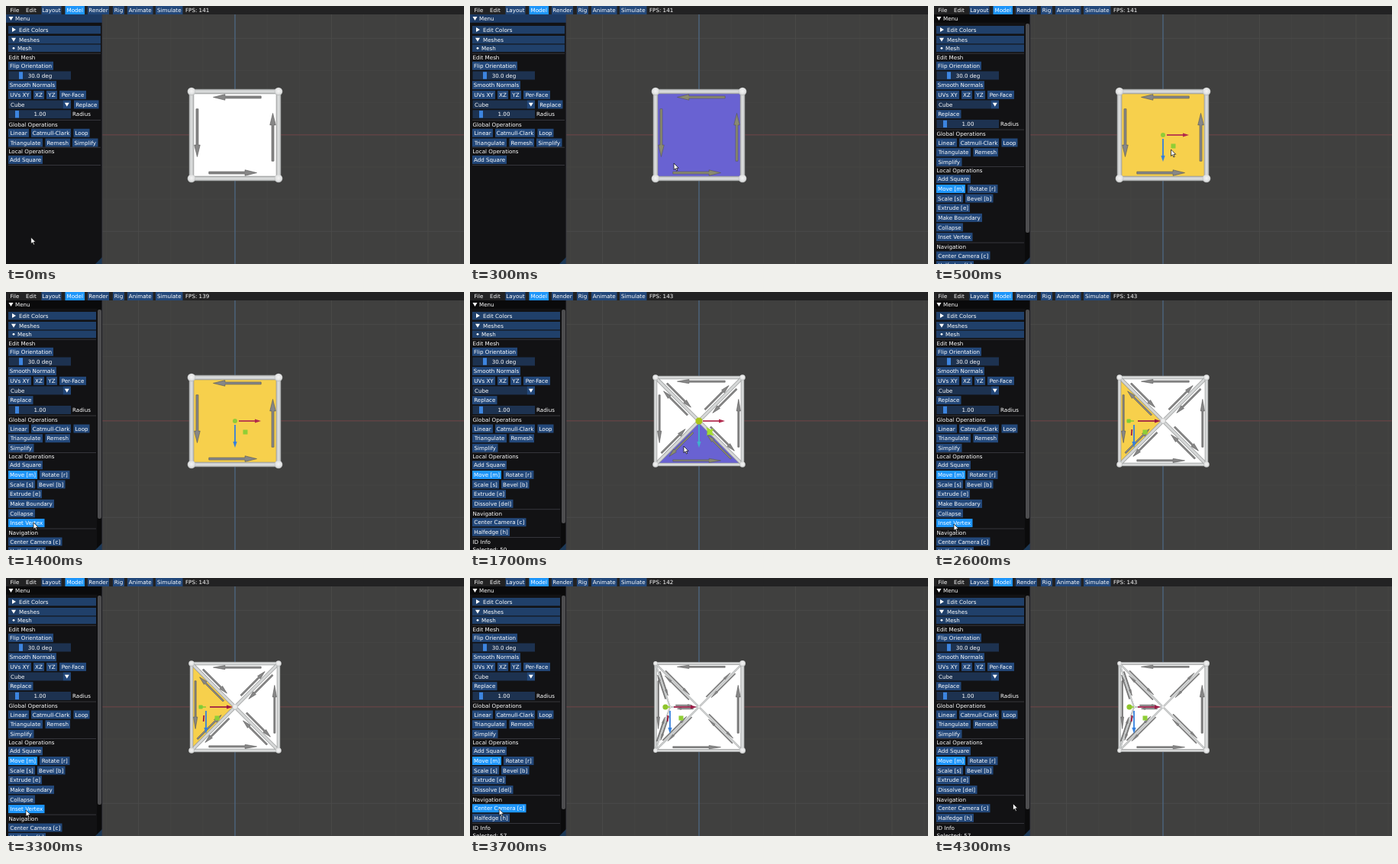
These frames come from a looping animation (600 px wide and 338 px high, 4400 ms). An HTML page:

```html
<!DOCTYPE html>
<html lang="en">
<head>
<meta charset="utf-8">
<title>Mesh editor</title>
<style>
html, body { margin: 0; width: 100%; height: 100%; overflow: hidden; background: #40403f; }
svg { display: block; width: 600px; height: 338px; }
text { font: 7.15px "DejaVu Sans", sans-serif; fill: #fff; white-space: pre; }
</style>
</head>
<body>
<svg id="stage" viewBox="0 0 600 338">
  <defs>
    <radialGradient id="ball" cx=".5" cy=".45" r=".55">
      <stop offset="0" stop-color="#f4f4f4"/>
      <stop offset=".65" stop-color="#e2e3e3"/>
      <stop offset="1" stop-color="#b4b6b6"/>
    </radialGradient>
  </defs>
  <g id="back"></g>
  <g id="mesh"></g>
  <g id="ui"></g>
  <path id="cursor" d="M0 0V8.6L2 6.8L3.4 10L4.8 9.4L3.4 6.3H6.2Z" fill="#fff" stroke="#000" stroke-width=".7"/>
</svg>
<script>
const $ = id => document.getElementById(id);
const LOOP = 4400, STEP = 100;
const BLUE = '#23487a', LIT = '#1e96fa', HEAD = '#20406a';
const YELLOW = '#f7d04c', VIOLET = '#6962d2';

const rect = (x, y, w, h, fill, more = '') =>
  `<rect x="${x}" y="${y}" width="${w}" height="${h}" fill="${fill}" ${more}/>`;
const line = (a, b, color, w, more = '') =>
  `<line x1="${a[0]}" y1="${a[1]}" x2="${b[0]}" y2="${b[1]}" stroke="${color}" stroke-width="${w}" ${more}/>`;
const poly = (pts, fill, more = '') => `<polygon points="${pts.join(' ')}" fill="${fill}" ${more}/>`;
const disc = (p, r, fill) => `<circle cx="${p[0]}" cy="${p[1]}" r="${r}" fill="${fill}"/>`;
const label = (s, x, y, anchor = 'start') =>
  `<text x="${x}" y="${y + 2.6}" text-anchor="${anchor}">${s}</text>`;

// ---- viewport grid
function grid() {
  let s = rect(0, 0, 600, 338, '#40403f');
  for (let i = -4; i <= 7; i++) {
    const x = 300 + i * 42.15;
    s += line([x, 11], [x, 338], i % 3 ? '#444443' : '#4a4a49', 1);
  }
  for (let i = -3; i <= 4; i++) {
    const y = 168.8 + i * 42.15;
    s += line([126, y], [600, y], i % 3 ? '#444443' : '#4a4a49', 1);
  }
  return s + line([126, 168.8], [600, 168.8], '#6b4044', 1) + line([300, 11], [300, 338], '#4f6f92', 1);
}

// ---- mesh
const V = [[243, 112], [357, 112], [357, 226], [243, 226], [300, 169], [262, 169]];
const FAN = [[1, 0, 4], [3, 2, 4], [2, 1, 4]];
const SHAPES = [
  { faces: [[1, 0, 3, 2]], radii: [5.3, 5.3, 5.3, 5.3], width: () => 6.5 },
  { faces: [...FAN, [0, 3, 4]], radii: [3.8, 3.8, 3.8, 3.8, 3.8], width: () => 4.5 },
  {
    faces: [...FAN, [0, 3, 5], [3, 4, 5], [4, 0, 5]],
    radii: [2.9, 4, 4, 2.9, 2, 1.5],
    width: (a, b) => Math.max(a, b) === 5 ? 1.9 : Math.max(a, b) === 4 ? 2.3 :
      a + b === 3 && a * b ? 5 : a + b === 3 ? 3.2 : 3.8
  }
];

// true when p lies inside the loop of points
function inside(p, pts) {
  return pts.every((a, i) => {
    const b = pts[(i + 1) % pts.length];
    return (b[1] - a[1]) * (p[0] - a[0]) - (b[0] - a[0]) * (p[1] - a[1]) >= 0;
  });
}

function bar(a, b, w) {
  return line(a, b, '#8c8e8e', w) + line(a, b, '#c6c8c8', w * .8) + line(a, b, '#d8dada', w * .4);
}

// arrow running beside one side of a face
function halfEdge(a, b, w, fill) {
  const dx = b[0] - a[0], dy = b[1] - a[1], len = Math.hypot(dx, dy);
  const ux = dx / len, uy = dy / len;
  const at = (t, off) => [a[0] + ux * t + uy * off, a[1] + uy * t - ux * off].map(v => +v.toFixed(2));
  const off = w * 1.15, s = Math.max(.55, w * .23), h = Math.max(1.2, w * .58);
  const tail = len * .2, tip = len * .75, neck = tip - len * .135;
  return poly([at(tail, off - s), at(neck, off - s), at(neck, off - h), at(tip, off),
    at(neck, off + h), at(neck, off + s), at(tail, off + s)], fill, 'stroke="#555" stroke-width=".6"');
}

function axis(o, dir, from, to, color, w) {
  const p = (t, n) => [o[0] + dir[0] * t + dir[1] * n, o[1] + dir[1] * t + dir[0] * n];
  return line(p(from, 0), p(to - 8, 0), color, w) + poly([p(to - 8, 2.6), p(to, 0), p(to - 8, -2.6)], color);
}

function gizmo(st) {
  const side = st >= 3, o = side ? V[5] : V[4];
  let s = axis(o, [1, 0], 5, side ? 35 : 34, side ? '#9c1844' : '#b22a4c', 1.7);
  s += axis(o, [0, 1], 5, 35, st === 2 ? '#3fb2cc' : '#3580dd', 1.8);
  s += rect(o[0] + (side ? 11.5 : 10.5), o[1] + 11.5, 6, 6, '#8fce36');
  if (st === 2) {
    s += poly([[309, 177], [315, 180], [319, 179], [317, 184], [320, 188], [313, 187], [310, 188], [312, 183]], '#a4dc30');
    return s + disc(o, 4.6, '#a9c41c');
  }
  if (!side) return s + disc(o, 3, '#90cc38');
  s += line([259.3, 180], [258.7, 188], '#a01840', 1.7);
  s += line([257, 169], [262, 169], '#8fce36', 1.6);
  return s + (st === 4 ? disc([256, 169], 3.6, '#8fc42c') : rect(252.5, 166.4, 5.2, 5.2, '#7fcc38', 'rx="1"'));
}

function mesh(st, mouse) {
  const shape = SHAPES[st < 2 ? 0 : st < 4 ? 1 : 2];
  let fills = '', bars = '', arrows = '';
  const done = {};
  shape.faces.forEach((f, i) => {
    const pts = f.map(k => V[k]);
    const picked = st === 1 || (st === 3 && i === 3);
    const over = !picked && mouse[0] > 126 && inside(mouse, pts);
    fills += poly(pts, picked ? YELLOW : over ? VIOLET : '#fff');
    f.forEach((a, j) => {
      const b = f[(j + 1) % f.length], w = shape.width(a, b);
      const key = Math.min(a, b) * 9 + Math.max(a, b);
      if (!done[key]) bars += bar(V[a], V[b], w);
      done[key] = true;
      arrows += halfEdge(V[a], V[b], w, over ? '#8a8a70' : '#878787');
    });
  });
  const balls = shape.radii.map((r, k) => disc(V[k], r, 'url(#ball)')).join('');
  return fills + bars + arrows + balls + (st ? gizmo(st) : '');
}

// ---- side panel
function panel(st, mouse) {
  const wide = st === 0, right = wide ? 124 : 118;
  const button = (s, x, w, y, on) => {
    const hot = on || (mouse[0] > x && mouse[0] < x + w && Math.abs(mouse[1] - y) < 5.6);
    return rect(x, y - 5.5, w, 11, hot ? LIT : BLUE) + label(s, x + w / 2, y, 'middle');
  };
  const tri = (x, y, down) => poly(down ? [[x - 3, y - 2.2], [x + 3, y - 2.2], [x, y + 2.8]]
    : [[x - 2, y - 3], [x - 2, y + 3], [x + 3, y]], '#fff');
  const header = (s, y, down) => rect(3, y - 5, right - 3, 10.4, HEAD) + tri(10, y, down) + label(s, 17, y);
  const slider = (s, y, grab) => rect(3.5, y - 5.5, 81.5, 11, '#1d3250') +
    rect(grab, y - 4.7, 5, 9.4, '#3d85e0') + label(s, 44.5, y, 'middle');
  const rule = y => rect(3, y, right - 3, .7, '#45454c');

  let s = rect(0, 11, 126, 327, '#121214') + rect(0, 11, 126, 10.8, wide ? '#1d3a63' : '#0a0a0b');
  s += tri(6.5, 16.3, true) + label('Menu', 12, 16.3);
  s += header('Edit Colors', 31, false) + header('Meshes', 44, true);
  s += rect(3, 50.5, right - 3, 9.6, HEAD) + disc([10, 55.3], 1.4, '#fff') + label('Mesh', 15, 55.3);
  s += rule(61.8) + label('Edit Mesh', 3.5, 67);
  s += button('Flip Orientation', 3, 59, 78.3) + slider('30.0 deg', 91, 17);
  s += button('Smooth Normals', 3, 63, 103.7);
  s += button('UVs XY', 3, 30, 116.4) + button('XZ', 36, 14, 116.4) + button('YZ', 53, 14, 116.4) +
    button('Per-Face', 70, 35, 116.4);
  s += rect(3.5, 123.5, 71, 11, '#1d3250') + rect(74.5, 123.5, 10.5, 11, BLUE) + tri(79.8, 129, true) + label('Cube', 6, 129);
  s += wide ? button('Replace', 89, 32.5, 129) : button('Replace', 3, 32.5, 141.7);

  const d = wide ? 0 : 12.7;
  s += slider('1.00', 141.8 + d, 12) + label('Radius', 87, 141.8 + d);
  s += rule(149 + d) + label('Global Operations', 3.5, 155 + d);
  s += button('Linear', 3, 27, 166.3 + d) + button('Catmull-Clark', 33, 52, 166.3 + d) + button('Loop', 88.5, 21, 166.3 + d);
  s += button('Triangulate', 3, 45, 179 + d) + button('Remesh', 51.5, 32.5, 179 + d);
  s += wide ? button('Simplify', 87, 33.5, 179) : button('Simplify', 3, 33.5, 204.3);
  const k = wide ? 0 : 25.3;
  s += rule(184.8 + k) + label('Local Operations', 3.5, 190.2 + k) + button('Add Square', 3, 45, 201.4 + k);

  if (wide) {
    s += rule(208);
  } else {
    s += button('Move [m]', 3, 38, 239.5, true) + button('Rotate [r]', 44, 39.5, 239.5);
    s += button('Scale [s]', 3, 35, 252) + button('Bevel [b]', 41, 36.5, 252) + button('Extrude [e]', 3, 44, 264.7);
    const vertex = st === 2 || st === 4, n = vertex ? 0 : 25.3;
    if (vertex) {
      s += button('Dissolve [del]', 3, 53.5, 277.4);
    } else {
      s += button('Make Boundary', 3, 60, 277.4) + button('Collapse', 3, 35, 290) + button('Inset Vertex', 3, 47.5, 302.6);
    }
    s += rule(284.4 + n) + label('Navigation', 3.5, 290.4 + n);
    s += button('Center Camera [c]', 3, 70.5, 301.7 + n) + button('Halfedge [h]', 3, 49, 314.3 + n);
    if (vertex) s += rule(321.3) + label('ID Info', 3.5, 327.5) + label('Selected: ' + (st === 2 ? 50 : 57), 3.5, 337.6);
    s += rect(119, 22, 7, 316, '#0b0b0c') + rect(120, 23, 5, vertex ? 280 : 274, '#4d4d4f', 'rx="2"');
  }
  s += poly([[126, 329], [126, 338], [117, 338]], '#1b3857');
  return s + rect(125.6, 11, .7, 327, '#3a3a42');
}

function menuBar(fps) {
  const tabs = [['Layout', 46.5, 26], ['Model', 77.5, 25.5], ['Render', 107, 28], ['Rig', 140, 15],
    ['Animate', 159, 33.5], ['Simulate', 196, 35.5]];
  return rect(0, 0, 600, 11, '#222223') + label('File', 5.5, 5.6) + label('Edit', 26, 5.6) +
    tabs.map(([s, x, w]) => rect(x, 0, w, 11, s === 'Model' ? LIT : BLUE) + label(s, x + w / 2, 5.6, 'middle')).join('') +
    label('FPS: ' + fps, 235, 5.6);
}

// ---- timeline: [ms, x, y] of the pointer tip
const PATH = [
  [0, 32.7, 303], [400, 310.5, 188], [600, 310.5, 188], [1200, 36, 302], [1500, 36, 302],
  [1700, 280, 202], [1900, 270, 167.5], [2200, 270, 167.5], [2600, 26, 304], [3500, 26, 304], [4300, 103.5, 295.5]
];
const ease = u => u * u * (3 - 2 * u);

function pointer(t) {
  const i = Math.max(1, PATH.findIndex(k => k[0] >= t));
  const [t0, x0, y0] = PATH[i - 1], [t1, x1, y1] = PATH[i];
  const u = ease((t - t0) / (t1 - t0));
  return [x0 + (x1 - x0) * u, y0 + (y1 - y0) * u];
}

const stage = t => [400, 1500, 2000, 3400].filter(c => t >= c).length;
const rate = t => t < 700 ? 141 : t < 1500 ? 139 : (t >= 2300 && t < 2500) || (t >= 3600 && t < 3900) ? 142 : 143;

function draw(t) {
  const st = stage(t), m = pointer(t);
  $('mesh').innerHTML = mesh(st, m);
  $('ui').innerHTML = panel(st, m) + menuBar(rate(t));
  $('cursor').setAttribute('transform', `translate(${m[0].toFixed(2)} ${m[1].toFixed(2)})`);
}

$('back').innerHTML = grid();
const start = performance.now();
let last = -1;
function tick() {
  const t = Math.floor((performance.now() - start) % LOOP / STEP) * STEP;
  if (t !== last) draw(last = t);
  requestAnimationFrame(tick);
}
tick();
</script>
</body>
</html>
```
